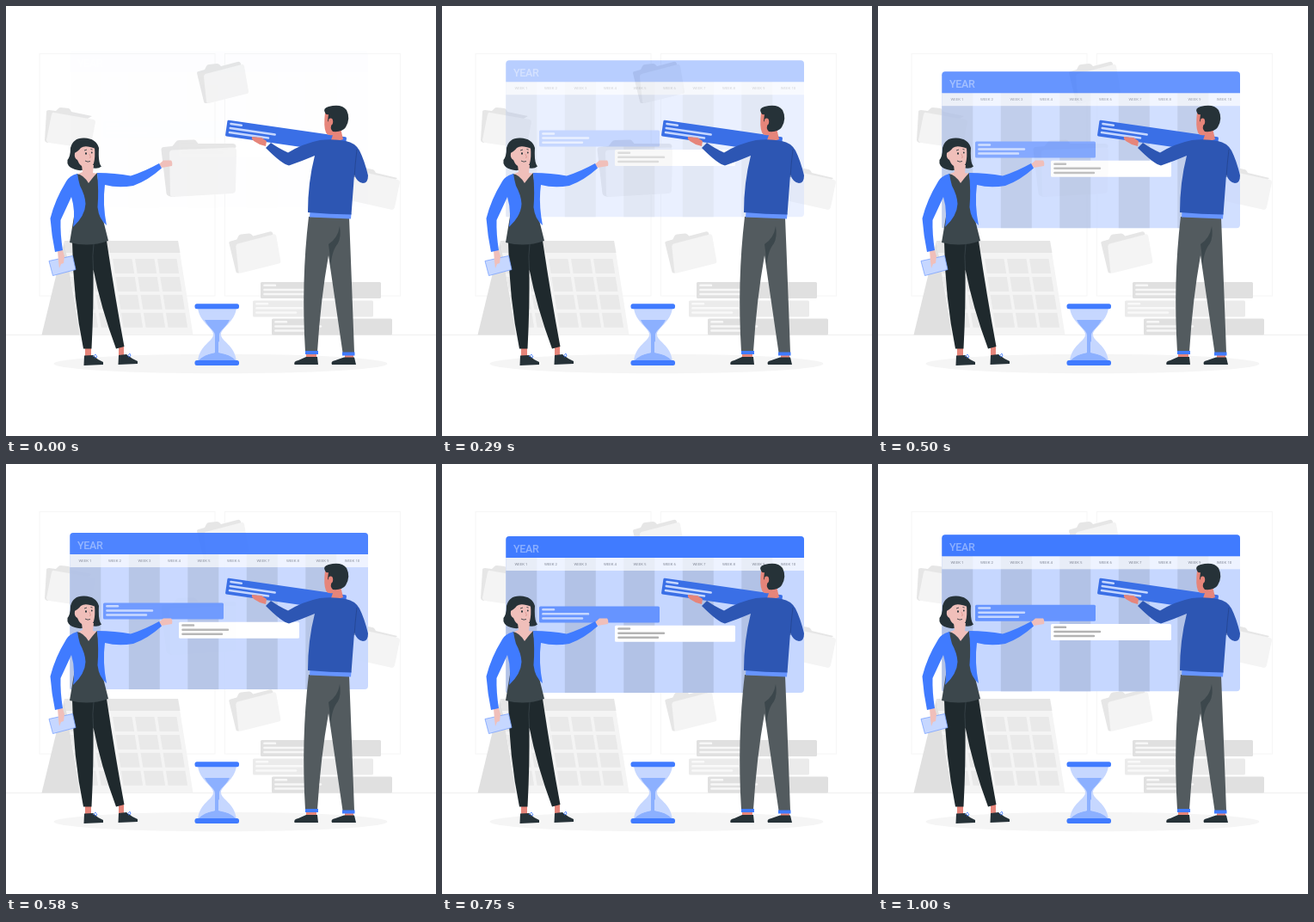
These frames come from a looping animation (500 px wide and 500 px high, 1.04 s). An HTML page:

```html
<!DOCTYPE html>
<html lang="en">
<head>
<meta charset="utf-8">
<style>
  html, body { margin: 0; width: 100%; height: 100%; overflow: hidden; background: #fff; }
  svg { display: block; width: 100%; height: 100%; }
  text { font-family: Roboto, "Liberation Sans", sans-serif; font-stretch: 75%; }
  .blue { fill: #407bff; }
  .pale { fill: #c6d7ff; }
  .sand { fill: #8cb0ff; }
  .navy { fill: #2d56b3; }
  .ink { fill: #263238; }
  .vest { fill: #3c474c; }
  .grey { fill: #535b5f; }
  .black { fill: #1f292d; }
  .light { fill: #f0bfba; }
  .skin { fill: #e6857a; }
  .back { fill: #e6e6e6; }
  .front { fill: #f4f4f4; }
</style>
</head>
<body>
<svg viewBox="0 0 500 500">
  <defs>
    <g id="folder">
      <path class="back" d="M222 78q0-2 2-2l7-2 2-4q1-2 3-2l9-1q2 0 3 1l2 2 19-5q3-1 4 2l1 4-40 42-2 0q-2 0-2-2z"/>
      <path class="front" d="M230 82q0-2 2-3l42-11q2-1 3 2l5 29q0 3-2 3l-44 11q-3 0-3-2z"/>
    </g>
  </defs>

  <!-- room -->
  <g fill="none" stroke="#f6f6f6">
    <rect x="39" y="55.500" width="204" height="281.500"/>
    <rect x="254.500" y="55.500" width="204" height="281.500"/>
    <path d="M0 382.500H500" stroke="#efefef"/>
  </g>
  <ellipse cx="249.500" cy="416" rx="194" ry="11.300" fill="#f5f5f5"/>
  <use href="#folder"/>
  <use href="#folder" x="37.300" y="197.500"/>
  <path class="back" d="M47 123q0-2 3-2l8 1 3-3q1-1 3-1l9 1q2 1 3 4l24 5-52 31q-3-1-3-3z"/>
  <path class="front" d="M53 126q1-3 3-2l46 8q2 1 2 3l-6 31-48-7q-3-1-3-3z"/>
  <path class="back" d="M405 193l11-5 10 2q2 0 4 4l25 6-10 10-40-6z"/>
  <path class="front" d="M407 194q0-2 3-2l46 10q2 1 2 3l-6 29q-1 3-3 3l-49-11z"/>
  <path class="back" d="M180.500 167q0-3 3-3l10-1 4-5q1-2 4-2l17-.5q2 0 3 2l2 2.500 40 0q4 0 4 4l-72 58q-8 0-9-4z"/>
  <path class="front" d="M190 171q0-3 3-3.500l71-3q4 0 4 4l-1 45q0 4-4 4.500l-69 4q-3 0-3-3z"/>

  <!-- desk calendar -->
  <path d="M68 273L41.500 382.500H86z" fill="#e0e0e0"/>
  <path d="M68 273H200L217.500 382.500H86z" class="front"/>
  <path d="M68 273H200L202.500 287H70z" fill="#e6e6e6"/>
  <g id="cells" fill="#e9e9e9"></g>
  <g id="stack"></g>

  <!-- hourglass -->
  <path class="pale" d="M223 351H268C266 368 250 374 250 382S266 394 268 413H223C225 394 241 390 241 382S225 368 223 351z"/>
  <path class="sand" d="M231 365H260C256 374 248 377 248 383V403Q260 405 267 412H224Q231 405 243 403V383C243 377 235 374 231 365z"/>
  <path d="M247 403V390Q259 398 263 407M243 403V390Q232 398 228 407" class="pale"/>
  <rect class="blue" x="219.500" y="346.300" width="51.500" height="6" rx="2.500"/>
  <rect class="blue" x="219.500" y="412" width="51.500" height="6" rx="2.500"/>

  <g id="board"></g>
  <g id="held" transform="translate(257.600 132.500) rotate(8.200)"></g>

  <!-- man -->
  <g>
    <path class="skin" d="M349 404h12v6h-12zM394 404h10v6h-10z"/>
    <path class="ink" d="M349 408H362L363 417H335.500Q334 413 340 412zM393 408.500H405L407 417H379Q377 413 383 412z"/>
    <path class="grey" d="M352 245L399 246Q402 320 405 403H391.500L375 290Q366 340 362 402H348Q343 320 352 245z"/>
    <path class="vest" d="M388 256Q386 270 375 277Q377 290 377.500 306Q378 285 386 276Q390 268 388 256z"/>
    <path class="blue" d="M348 401h15v4h-15zM391 402.500h14.500v4h-14.500z"/>
    <path class="skin" d="M303 157L297 153 286 152Q285 155 289 157.500L295 161 302 163z"/>
    <path fill="#6694ff" d="M353.500 239L401.500 241 401 247.500 353 245.500z"/>
    <path class="skin" d="M371 124Q369 140 372 147Q374 151 380 150L378 156Q386 158 392 155L389 142 388 126z"/>
    <path class="navy" d="M365 156Q380 154 395 157Q406 159 411 168Q417 180 421 197Q421 206 415 206Q408 205 405 196L401.500 242.500Q376 242 351 240Q351 205 359 174Q345 180 329 185.500Q321 184 302 165L308 159Q316 165 328 170.500Q345 160 365 156z"/>
    <path d="M408 167Q406 183 405 199" fill="none" stroke="#24458f" stroke-width=".8"/>
    <path class="ink" d="M371 124Q368 119 375 117Q390 113 396 121Q401 131 395 141Q391 147 380 146Q376 142 379 137L374 134 375 126Q372 127 371 124z"/>
    <ellipse class="skin" cx="377.500" cy="134.500" rx="2.700" ry="4"/>
  </g>

  <!-- woman -->
  <g>
    <path class="skin" d="M92 397h7v10h-7zM131 395h6v11h-6z"/>
    <path class="ink" d="M91 406.500L101 406Q106 411 113 414V417L90.500 418zM131 406L140 405Q146 410 153 413V416L130.500 417z"/>
    <path d="M101 408l3-3 2 3-3 1M141 407l3-3 1 3-3 1" fill="none" stroke="#407bff" stroke-width=".8"/>
    <path class="black" d="M77 274L117 273Q127 340 137.500 396L128 398.500Q110 350 101.500 306Q102 350 99.500 398.500H90Q78 340 77 274z"/>
    <path d="M102 277Q100 290 101.500 306" fill="none" stroke="#435057" stroke-width=".6"/>
    <path class="ink" d="M75 165Q78 153 91 153.500Q105 154 108 165Q107 183 111 186.500Q107 190 99 188Q88 193 80 190Q70 187 71.500 179Q75 175 75 165z"/>
    <path class="light" d="M88 185L102 185 101 194 107 195 97 207 84 195 89 193z"/>
    <path class="light" d="M80 171Q84 162 92 163Q98 161 103 165Q104 176 102 183Q99 190 93 188.500Q86 187 83 179Q79 177 80 171z"/>
    <path class="ink" d="M79 171Q83 170 87 165Q92 161 104 166L96 157 81 160z"/>
    <path class="ink" d="M92 171.500a1 1.200 0 1 0 2 0a1 1.200 0 1 0-2 0M99 170.500a.8 1.100 0 1 0 1.600 0a.8 1.100 0 1 0-1.600 0"/>
    <path d="M91 168l3-1M98.500 166.500l2 .5M92 180q3 2 6 .5" fill="none" stroke="#263238" stroke-width=".8"/>
    <path d="M97 172l1.500 4-1.500.5" fill="none" stroke="#d98f88" stroke-width=".7"/>
    <path class="vest" d="M82 195Q90 196 96 206Q102 198 106 194L112 245 119 273Q97 281 74 275L79 245z"/>
    <path class="light" d="M178 184L183 179.500 192 179.500Q194 182 193 186L187 187 181 188z"/>
    <path class="blue" d="M106 194Q127 194 145 197.500Q162 192 178 183L181 188.500Q165 203 148 209Q130 212 115 208Q112 230 117 255Q108 248 106.500 234Q108 215 106 194z"/>
    <path class="pale" d="M50 296.500L77.500 290.500 81 306.500 54.500 313.500z" stroke="#7aa2ff" stroke-width=".8"/>
    <path class="light" d="M60 284L66 284 68 291 67 299 64 300 62 305 61 297z"/>
    <path class="blue" d="M83 195Q74 197 70 204Q57 225 51.500 247Q53 267 57 286L66 284Q63 265 63.500 249L76 222Q81 238 78 257Q92 244 92.500 230Q92 220 86 209Q84 202 83 195z"/>
  </g>
</svg>

<script>
const FRAMES_PER_MS = 0.024, LOOP = 1040, LEAD = 28;
const $ = id => document.getElementById(id);
const rect = (x, y, w, h, fill, extra = "") =>
  `<rect x="${x}" y="${y}" width="${w}" height="${h}" fill="${fill}" ${extra}/>`;

// A task bar with three lines of writing
const bar = (x, y, fill, ink) => rect(x, y, 140, 19, fill, 'rx="1.5"') +
  [15, 55, 48].map((w, i) => rect(x + 3.2, y + 2.6 + i * 5.1, w, 2.5, ink, 'rx="1.2"')).join("");

let cells = "";
for (let row = 0; row < 4; row++)
  for (let col = 0; col < 5; col++) {
    const x = 72 + col * 26 + row * 3.3, y = 294 + row * 20.9;
    cells += `<path d="M${x} ${y}h22.500l2.700 17h-22.500z"/>`;
  }
$("cells").innerHTML = cells;

$("stack").innerHTML = bar(296, 321, "#e0e0e0", "#f7f7f7") +
  bar(287, 342.4, "#ebebeb", "#f9f9f9") + bar(309, 363.5, "#e0e0e0", "#f7f7f7");
$("held").innerHTML = bar(0, 0, "#3a6fe6", "#c6d7ff");

let shades = "", labels = "";
for (let i = 0; i < 10; i++) {
  const mid = 92 + i * 34.5;
  if (i % 2 === 0) shades += rect(74.3 + i * 34.25, 25, 36, 157, "#b2c2e6", i ? "" : 'rx="1"');
  labels += `<text x="${mid}" y="34" font-size="4.4" text-anchor="middle" fill="#858b99">WEEK ${i + 1}</text>`;
}
$("board").innerHTML = rect(74.3, 0, 346.7, 182, "#c6d7ff", 'rx="4"') + shades +
  rect(74.3, 25, 346.7, 15, "#fff", 'opacity=".7"') +
  '<path class="blue" d="M74.300 25V4q0-4 4-4H417q4 0 4 4V25z"/>' +
  '<text x="83" y="19" font-size="12.5" font-weight="500" letter-spacing="-.3" fill="#8cb0ff">YEAR</text>' +
  labels + bar(113, 81.4, "#6694ff", "#c6d7ff") + bar(201, 103.7, "#fff", "#b3b3b3");

const curve = (a, b, s) => 3 * s * (1 - s) ** 2 * a + 3 * s * s * (1 - s) * b + s ** 3;

// Ease with a late overshoot: solve the curve for time, then read its height
function ease(t) {
  let lo = 0, hi = 1;
  for (let i = 0; i < 30; i++) {
    const mid = (lo + hi) / 2;
    if (curve(0.36, 0.5, mid) < t) lo = mid; else hi = mid;
  }
  return curve(-0.01, 1.38, lo);
}

function draw() {
  const step = Math.floor((performance.now() % LOOP + 4) * FRAMES_PER_MS);
  const p = ease(Math.min(1, (step / FRAMES_PER_MS + LEAD) / 1000));
  $("board").setAttribute("transform", `translate(0 ${52.3 + 30 * p})`);
  $("board").setAttribute("opacity", Math.max(0, Math.min(1, p)));
  requestAnimationFrame(draw);
}
draw();
</script>
</body>
</html>
```
